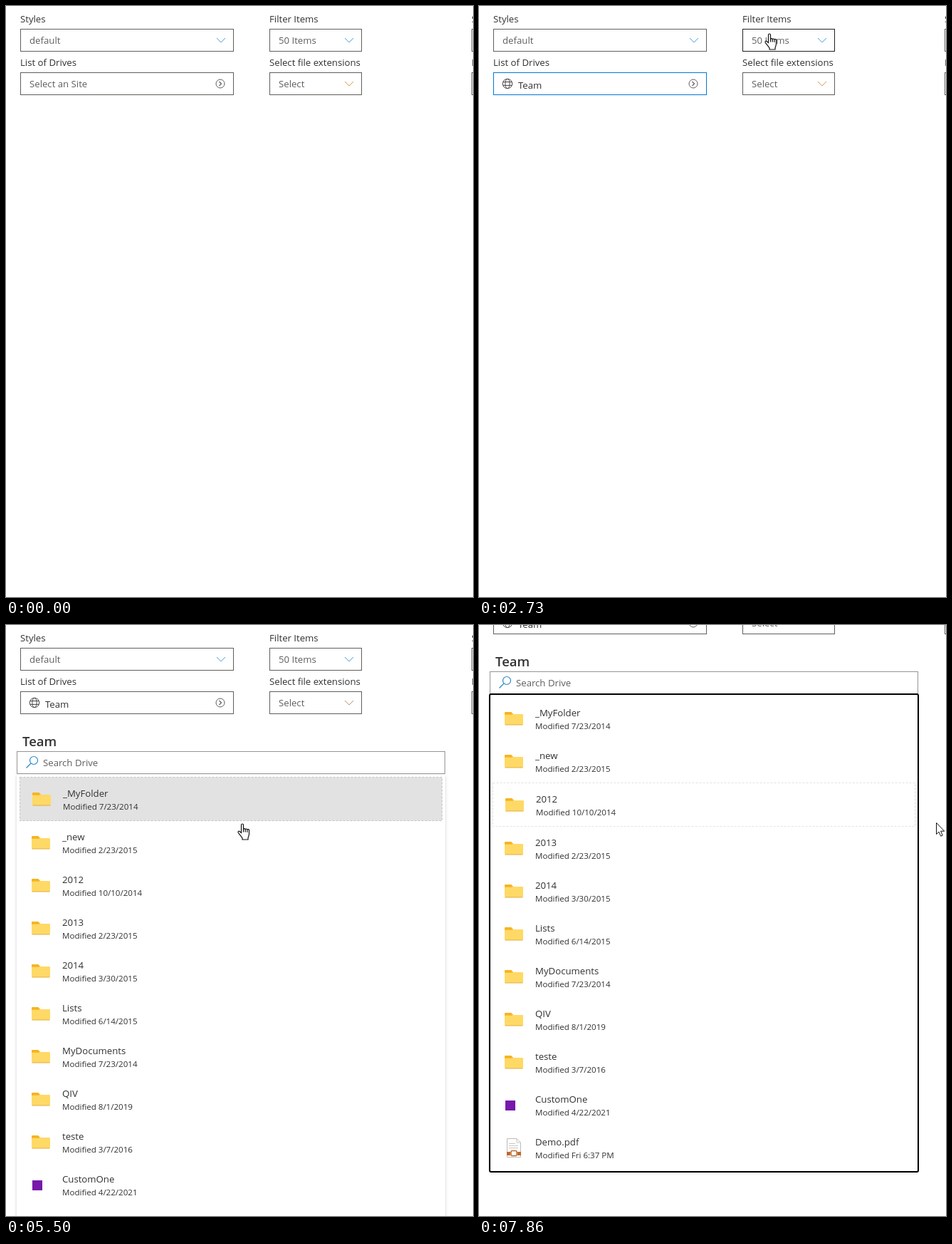
Write an HTML page that moves like this. It is 656 by 829 pixels and loops after 8000 ms.

```html
<!DOCTYPE html>
<html lang="en">
<head>
<meta charset="utf-8">
<title>Drive picker</title>
<style>
html, body { margin: 0; width: 100%; height: 100%; overflow: hidden; background: #fff; }
svg { display: block; font: 13.2px "Open Sans", "Noto Sans", sans-serif; }
.small { font-size: 11.55px; }
.title { font-size: 18.5px; font-weight: 600; }
.shadow { filter: drop-shadow(0 1.5px 2px rgba(0, 0, 0, .18)); }
</style>
</head>
<body>
<svg id="stage" width="656" height="829" viewBox="0 0 656 829"></svg>
<script>
const LOOP = 8000;
const INK = '#323130', GREY = '#605e5c', DARK = '#201f1e', BLUE = '#0078d4';
const stage = document.getElementById('stage');

const SITES = [
  ['Team'], ['Example', '/Example'], ['Exam', '/Example/Exam'], ['Example123', '/Example123'],
  ['ITPRO', '/ITPRO'], ['CDN', '/sites/CDN'], ['Catalog', '/sites/Catalog'],
  ['Example', '/sites/Example'], ['England12', '/sites/Example/England'], ['HUB', '/sites/HUB'],
  ['Home', '/sites/Home'], ['Project Management 2019', '/sites/ProjectManagement2019'],
  ['Test', '/sites/TestName'], ['United', '/sites/comm1'], ['Team Site']
];

const FILES = [
  ['_MyFolder', '7/23/2014'], ['_new', '2/23/2015'], ['2012', '10/10/2014'],
  ['2013', '2/23/2015'], ['2014', '3/30/2015'], ['Lists', '6/14/2015'],
  ['MyDocuments', '7/23/2014'], ['QIV', '8/1/2019'], ['teste', '3/7/2016'],
  ['CustomOne', '4/22/2021', 'notebook'], ['Demo.pdf', 'Fri 6:37 PM', 'page']
];

// Pointer tip: time, x, y
const POINTER = [
  [130, 634, 726], [370, 609, 651], [600, 609, 651], [610, 606, 364], [1160, 226, 113],
  [2110, 226, 113], [2460, 408, 39], [2860, 408, 39], [3060, 397, 77], [3645, 397, 77],
  [3660, 391, 80], [3750, 391, 80], [4350, 280, 249], [5420, 280, 249], [5500, 332, 279],
  [5560, 332, 279], [5780, 450, 294], [6110, 641, 277], [6250, 641, 277], [6260, 642, 277]
];

const clamp = u => Math.min(1, Math.max(0, u));
const progress = (t, from, to) => clamp((t - from) / (to - from));
const smooth = u => u * u * (3 - 2 * u);

function pointerAt(t) {
  const next = POINTER.findIndex(key => key[0] > t);
  if (next === 0) return POINTER[0].slice(1);
  if (next < 0) return POINTER.at(-1).slice(1);
  const [t0, x0, y0] = POINTER[next - 1], [t1, x1, y1] = POINTER[next];
  const u = smooth(progress(t, t0, t1));
  return [x0 + (x1 - x0) * u, y0 + (y1 - y0) * u];
}

const text = (x, y, content, fill = INK, cls = '') =>
  `<text x="${x}" y="${y}" fill="${fill}" class="${cls}">${content}</text>`;
const line = (d, stroke, width = 1) =>
  `<path d="${d}" fill="none" stroke="${stroke}" stroke-width="${width}"/>`;
const box = (x, y, w, h, fill, extra = '') =>
  `<rect x="${x}" y="${y}" width="${w}" height="${h}" fill="${fill}" ${extra}/>`;
const frame = (x, y, w, h, stroke, fill = '#fff', extra = '') =>
  box(x + .5, y + .5, w - 1, h - 1, fill, `stroke="${stroke}" ${extra}`);
const move = (x, y, content, extra = '') => `<g transform="translate(${x} ${y})" ${extra}>${content}</g>`;
const chevron = (x, y, color) => line(`M${x} ${y}l6 6 6-6`, color);

const globe = (x, y) => move(x, y, `<g fill="none" stroke="#484644">
  <circle r="6.7"/><ellipse rx="3.2" ry="6.7"/><path d="M-6.2-2.4H6.2M-6.2 2.4H6.2"/></g>`);

const icons = {
  folder: `<path d="M36 38V22q0-1 1-1h8.500l2 3v2z" fill="#f5b324"/>
    <rect x="36" y="24" width="26" height="15" rx="1.200" fill="#ffd966"/>
    <path d="M36.500 39H61.500" stroke="#e2ad3c"/><path d="M36 24.500h10l2-1.500" stroke="#fbbd2c" fill="none"/>`,
  notebook: box(37, 64 - 40, 14, 14, '#7719aa'),
  page: `<path d="M39.500 17.500h13.500l5.500 5.500v20.500h-19z" fill="#fff" stroke="#bebbb8"/>
    <path d="M53 17.500v5.500h5.500M42 24.500h9M42 27.500h13M42 30.500h13" fill="none" stroke="#c8c6c4"/>
    <path d="M39 36h5v5h-5zM54 36h5v5h-5z" fill="#c0692b"/>
    <rect x="45" y="34.500" width="8" height="7" rx="1.500" fill="#fff" stroke="#c0692b" stroke-width="1.500"/>`
};

const ARROW = '<path d="M.5.5V16.500L4 13.200l2.700 6 2.500-1.100L6.600 12.200H11.700z" fill="#fff" stroke="#111"/>';
const HAND = `<path d="M5.500 13.500V2.500a1.500 1.500 0 0 1 3 0V8.500a1.400 1.400 0 0 1 2.700.4a1.400 1.400 0 0 1 2.700.6
  a1.300 1.300 0 0 1 2.600.8V15c0 3-1.500 4-1.500 6v2H7v-2C6 19 3 16 1.200 13.200c-.9-1.600 1-2.600 2.200-1.400z
  M8.500 8.500v4M11.200 9v3.500M13.900 9.800v3" fill="#fff" stroke="#111" stroke-width="1.200"/>`;

function drawFields(t, over) {
  const chosen = t >= 2600;
  const edge = name => over === name ? DARK : GREY;
  const driveEdge = chosen && t < 4750 ? BLUE : edge('drive');
  return text(20, 23, 'Styles') + frame(20, 32, 300, 32, GREY) + text(33, 53, 'default', GREY) +
    chevron(296, 45, '#4aa5da') +
    text(370, 23, 'Filter Items') + frame(370, 32, 130, 32, edge('filter')) +
    text(383, 53, '50 Items', GREY) + chevron(476, 45, '#4aa5da') +
    text(20, 84, 'List of Drives') + frame(20, 93, 300, 32, driveEdge) +
    (chosen ? globe(40, 109) + text(55, 116, 'Team') : text(33, 114, 'Select an Site', GREY)) +
    '<circle cx="301" cy="109" r="6" fill="none" stroke="#605e5c"/>' +
    line('M299.500 106l3 3-3 3', GREY, 1.2) +
    text(370, 84, 'Select file extensions') + frame(370, 93, 130, 32, edge('extension')) +
    text(383, 114, 'Select', GREY) + chevron(476, 106, t < 4750 ? '#d59a4e' : '#b98f75') +
    text(654, 23, 'S') + text(654, 84, 'L') +
    frame(654, 32, 130, 32, GREY) + frame(654, 93, 130, 32, GREY);
}

function drawSites(t) {
  const slide = -20 * (1 - progress(t, 1300, 1667)) ** 5;
  const rows = SITES.map(([name, path], i) => {
    const y = i ? 15 + 57 * i : 35;
    return globe(344.5, y - 2) + text(360, y + 5, name) +
      (path ? text(337, y + 25, path, '#a19f9d', 'small') : '');
  }).join('');
  return move(slide, 0,
    box(320, -20, 300, 900, '#fff', 'class="shadow"') + box(320, 0, 300, 18, '#f3f2f1') +
    '<svg x="320" y="0" width="299" height="20">' +
    text(17, 3, '/personal/elio_ravn_elioravn_onmicrosoft_com/Documents', '#a19f9d', 'small') + '</svg>' + rows,
    `opacity="${progress(t, 1300, 1667)}"`);
}

function drawFiles(focus, hovered) {
  return FILES.map(([name, date, icon = 'folder'], i) => {
    const focused = i === focus, shift = focused ? 1 : 0;
    const top = 213 + 60 * i + (focus >= 0 && i > focus ? 2 : 0);
    const fill = i !== hovered ? '#fff' : focused ? '#e2e2e2' : '#f3f2f1';
    const back = focused
      ? frame(19, top, 594, 62, i === hovered ? '#c4c4c4' : '#e4e3e2', fill, 'stroke-dasharray="3 2"')
      : box(19, top, 594, 60, fill);
    return back + move(shift, top + shift,
      icons[icon] + text(79, 27, name) + text(79, 45, 'Modified ' + date, INK, 'small'));
  }).join('');
}

function drawDrive(t, over, hoveredRow) {
  const focus = t < 4750 ? -1 : t < 7120 ? 0 : t < 7860 ? 1 : 2;
  const header = text(23, 170, 'Team', INK, 'title') +
    frame(15, 177, 602, 32, over === 'search' ? DARK : '#979593') +
    '<circle cx="39" cy="190" r="5.500" fill="none" stroke="#2b88c8" stroke-width="1.200"/>' +
    line('M35 194l-6.500 6.500', '#2b88c8', 1.2) + text(52, 198, 'Search Drive', GREY);
  if (t < 3060) return header;
  const outline = t >= 7120
    ? box(15, 209, 602, 670, 'none', `stroke="#000" stroke-width="2" rx="2"`) : '';
  return box(15, 210, 602, 669, '#fff', 'class="shadow"') + header + drawFiles(focus, hoveredRow) + outline;
}

function render(t) {
  const [x, y] = pointerAt(t);
  const panelOpen = t >= 1300 && t < 2600;
  const covered = panelOpen && x >= 320;
  const within = (left, top, w, h) => !covered && x >= left && x < left + w && y >= top && y < top + h;
  const over = within(20, 93, 300, 32) ? 'drive'
    : within(370, 32, 130, 32) ? 'filter'
    : within(370, 93, 130, 32) ? 'extension'
    : t >= 2860 && within(15, 177, 602, 32) ? 'search' : '';
  // Row hover trails the pointer by a few pixels.
  const hoveredRow = t >= 3060 && within(19, 218, 594, 600) ? Math.floor((y - 218) / 62) : -1;
  const scroll = 112 * smooth(progress(t, 7120, 7330));
  const hand = covered || (over && over !== 'search') || hoveredRow >= 0;
  const visible = t >= 130 && (t < 410 || t >= 610);

  stage.innerHTML =
    move(0, -scroll, drawFields(t, over) + (t >= 2860 ? drawDrive(t, over, hoveredRow) : '')) +
    (panelOpen ? drawSites(t) : '') +
    (visible ? hand ? move(x - 7, y - 1, HAND) : move(x, y, ARROW) : '');
}

const start = performance.now();
function tick() {
  render((performance.now() - start) % LOOP);
  requestAnimationFrame(tick);
}
tick();
</script>
</body>
</html>
```
